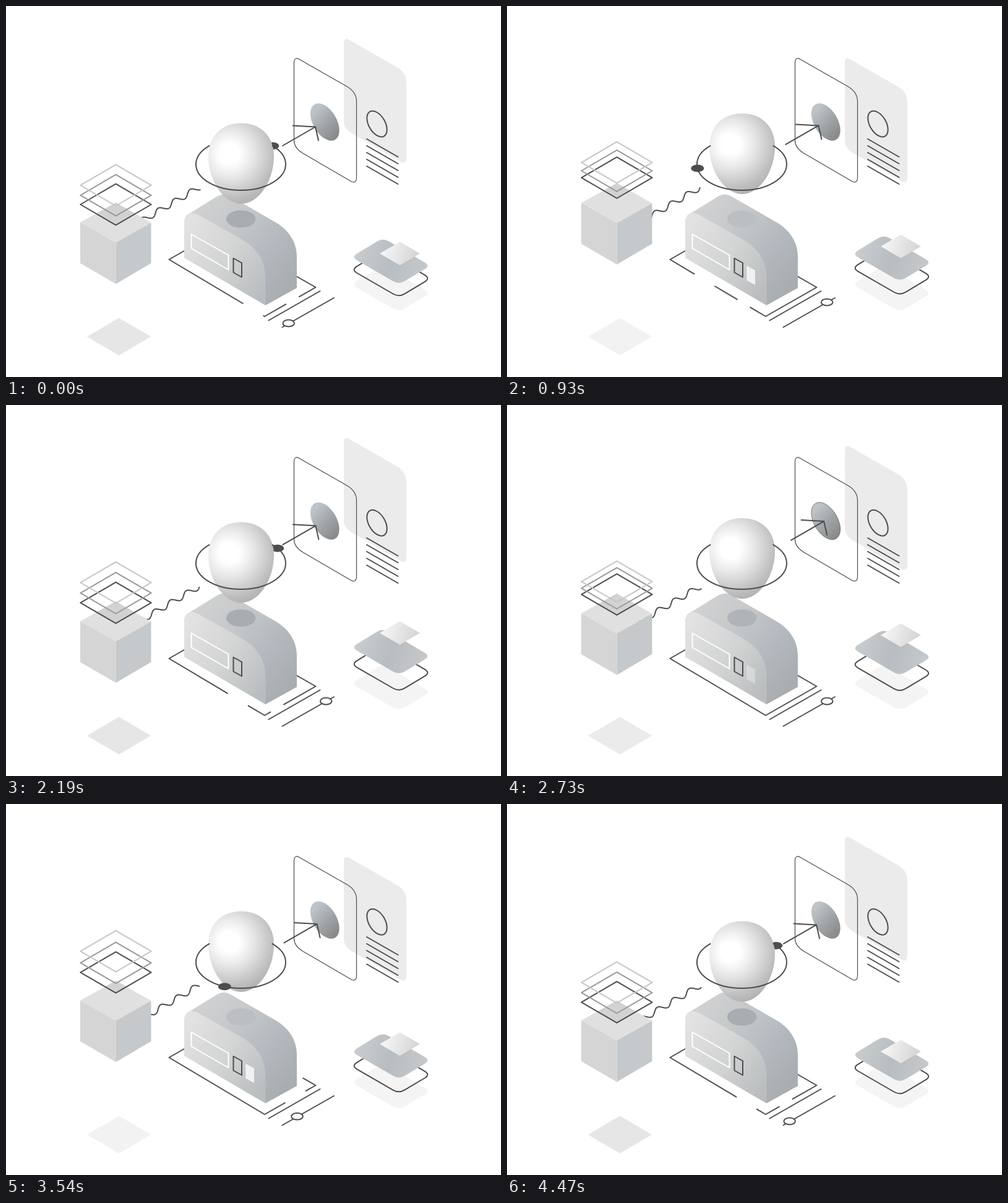
An HTML page with a canvas for the animation above (4500 ms loop, 800 px wide and 600 px high).

```html
<!DOCTYPE html>
<html lang="en">
<head>
<meta charset="utf-8">
<title>Isometric machine</title>
<style>
html, body { margin: 0; width: 100%; height: 100%; overflow: hidden; background: #fff; }
canvas { display: block; }
</style>
</head>
<body>
<canvas id="stage" width="800" height="600"></canvas>
<script>
const ctx = document.getElementById('stage').getContext('2d');
const LOOP = 4500, HALF = LOOP / 2, QUARTER = LOOP / 4;
const INK = '#4d4d4d', TAU = Math.PI * 2;

// 0 -> 1 -> 0 over one period
const swing = (t, period, delay = 0) => (1 - Math.cos(TAU * (t - delay) / period)) / 2;
const ease = x => (1 - Math.cos(Math.PI * Math.min(1, Math.max(0, x)))) / 2;
const mix = (a, b, k) => a + (b - a) * k;
const grey = v => `rgb(${v},${v},${v})`;

function linear(x0, y0, x1, y1, ...colors) {
  const g = ctx.createLinearGradient(x0, y0, x1, y1);
  colors.forEach((c, i) => g.addColorStop(i / (colors.length - 1), c));
  return g;
}

function poly(points, closed = true) {
  const p = new Path2D();
  points.forEach(([x, y], i) => i ? p.lineTo(x, y) : p.moveTo(x, y));
  if (closed) p.closePath();
  return p;
}

const rhombus = (cx, cy, w, h) => poly([[cx - w, cy], [cx, cy - h], [cx + w, cy], [cx, cy + h]]);

function fill(path, style) {
  ctx.fillStyle = style;
  ctx.fill(path);
}

function stroke(path, style = INK, width = 2) {
  ctx.strokeStyle = style;
  ctx.lineWidth = width;
  ctx.stroke(path);
}

function ellipse(x, y, rx, ry, from = 0, to = TAU) {
  const p = new Path2D();
  p.ellipse(x, y, rx, ry, 0, from, to);
  return p;
}

function isoCircle(x, y, r) {
  const p = new Path2D(), c = new Path2D();
  c.arc(0, 0, r, 0, TAU);
  p.addPath(c, new DOMMatrix([0.866, 0.5, 0, 1, x, y]));
  return p;
}

function at(x, y, draw) {
  ctx.save();
  ctx.translate(x, y);
  draw();
  ctx.restore();
}

const sheet = new Path2D('M0 8C0 1 3-2 9 2L86 46C96 52 101 60 101 70V193C101 200 97 202 92 199L14 153.500C5 148 0 142 0 133Z');
const egg = new Path2D('M380 189.500C412 189.500 433 211 433 243C433 283 408 320 380 320C352 320 327 283 327 243C327 211 348 189.500 380 189.500Z');
const body = new Path2D('M288 407V350Q288 341 295 336.500L341 308Q352 301.500 363 308L436 350C458 363 470 383 470 405V456L419.500 484Z');
const front = new Path2D('M288 407V351C288 336 297 331 311 338L382 378C406 392 419.500 412 419.500 440V484Z');
const floorLine = poly([[288, 396], [263.5, 410], [418, 502], [500.5, 455], [470, 437.5]], false);

function makePlate() {
  const corners = [[-64, -7], [-13, -38], [64, 7], [13, 37.5]];
  const p = new Path2D(), cut = 11;
  const toward = (a, b) => {
    const k = cut / Math.hypot(b[0] - a[0], b[1] - a[1]);
    return [mix(a[0], b[0], k), mix(a[1], b[1], k)];
  };
  corners.forEach((c, i) => {
    const start = toward(c, corners[(i + 3) % 4]), end = toward(c, corners[(i + 1) % 4]);
    i ? p.lineTo(...start) : p.moveTo(...start);
    p.quadraticCurveTo(...c, ...end);
  });
  p.closePath();
  return p;
}
const plate = makePlate();

// The moon runs at constant speed along its elliptical orbit.
const ORBIT = { x: 379.5, y: 256, rx: 72.5, ry: 42 };
const orbitLength = [0], ORBIT_STEPS = 720;
const orbitAngle = i => -Math.PI / 4 - TAU * i / ORBIT_STEPS;
for (let i = 0; i < ORBIT_STEPS; i++) {
  const a = orbitAngle(i + 0.5);
  orbitLength.push(orbitLength[i] + Math.hypot(ORBIT.rx * Math.sin(a), ORBIT.ry * Math.cos(a)));
}

function moonAngle(t) {
  const goal = (t % HALF) / HALF * orbitLength[ORBIT_STEPS];
  const i = Math.max(1, orbitLength.findIndex(l => l >= goal));
  const k = (goal - orbitLength[i - 1]) / (orbitLength[i] - orbitLength[i - 1]);
  return orbitAngle(i - 1 + k);
}

function drawCards(t) {
  at(546, 53 + 34 * swing(t, HALF), () => fill(sheet, '#ebebeb'));
  stroke(isoCircle(599.5, 190.7, 18.7));
  for (let i = 0; i < 5; i++) {
    const y = 215 + i * 11;
    stroke(poly([[583, y], [633.5, y + 29]], false));
  }
  const push = swing(t, QUARTER);
  const disc = isoCircle(515.3, 187.6, 27);
  fill(disc, linear(496, 172, 535, 208, '#bdc3c7', '#a2a6a9', '#8a8a8a'));
  stroke(disc, `rgba(110,110,110,${push * push})`, 1);
  at(465.5, 84.5, () => stroke(sheet, INK, 1.2));
  at(12.8 * push, -7.8 * push, () => {
    stroke(poly([[447, 226], [500, 195.5]], false));
    stroke(poly([[463.5, 193.5], [500, 195.5], [505, 217.5]], false));
  });
}

function drawWave(t) {
  const wavelength = 30, shift = 7.3 + wavelength * (t % 250) / 250;
  const points = [];
  for (let s = -100; s <= 28.5; s += 0.5) {
    const d = 4.5 * Math.sin(TAU * (s - shift) / wavelength);
    points.push([287 + 0.862 * s - 0.507 * d, 308 - 0.507 * s - 0.862 * d]);
  }
  stroke(poly(points, false));
}

function drawCube(t) {
  const lift = swing(t, HALF);
  fill(rhombus(182.5, 534.7, 51.7, 30.2), grey(mix(230, 243, lift)));
  const y = 318 - 34 * lift;
  const top = poly([[177.5, y], [234.5, y + 32.5], [177.5, y + 64.5], [120, y + 32]]);
  fill(top, '#e0e0e0');
  fill(poly([[120, y + 32], [177.5, y + 64.5], [177.5, y + 131.5], [120, y + 98]]), '#d5d5d5');
  fill(poly([[177.5, y + 64.5], [234.5, y + 32.5], [234.5, y + 98], [177.5, y + 131.5]]), '#c5c9cc');

  const layers = [
    [321.4, 50, 65, INK],
    [307.7, 51, 130, '#999'],
    [294, 56, 195, '#c6c6c6']
  ].map(([base, rise, delay, color]) =>
    [rhombus(177.5, base - rise * swing(t, HALF, delay), 57.2, 33.3), color]);
  ctx.save();
  ctx.clip(top);
  fill(layers[0][0], '#d2d2d2');
  ctx.restore();
  layers.forEach(([path, color]) => stroke(path, color));
}

function drawFloor(t) {
  const tail = 167 + 538 * (t % QUARTER) / QUARTER;
  ctx.save();
  ctx.setLineDash([41.5, 25, 432.5, 39]);
  ctx.lineDashOffset = -(tail + 39);
  stroke(floorLine);
  ctx.restore();
  stroke(poly([[424.5, 508.5], [507.5, 461]], false));
  stroke(poly([[446.5, 519.5], [530, 472]], false));
  const k = ease(t / 950) - ease((t - 2875) / 975);
  const knob = ellipse(mix(456.7, 517.2, k), mix(513, 479, k), 9.3, 5.4);
  fill(knob, '#fff');
  stroke(knob);
}

function drawMachine(t) {
  const lift = swing(t, HALF);
  fill(body, linear(320, 315, 470, 440, '#d0d1d2', '#c5c8ca', '#b3b9be', '#a9adb0'));
  fill(front, linear(288, 360, 425, 450, '#e2e2e2', '#d3d4d4', '#b9bdbf'));
  fill(ellipse(379.7, 344.5, 23.8, 14), `rgb(${mix(168, 188, lift)},${mix(173, 192, lift)},${mix(177, 196, lift)})`);
  stroke(poly([[299.5, 369], [359.5, 403], [359.5, 426.5], [299.5, 392]]), '#fff');
  stroke(poly([[367.5, 408], [381, 415.5], [381, 438.5], [367.5, 431]]));
  fill(poly([[387.3, 420], [401, 427.5], [401, 451], [387.3, 443.5]]), `rgba(244,244,244,${lift})`);
}

function drawPlanet(t) {
  const a = moonAngle(t);
  const moon = ellipse(ORBIT.x + ORBIT.rx * Math.cos(a), ORBIT.y + ORBIT.ry * Math.sin(a), 10.5, 6);
  const inFront = Math.sin(a) > 0;
  if (!inFront) fill(moon, INK);
  at(0, -17 * swing(t, HALF), () => {
    const g = ctx.createRadialGradient(361, 239, 0, 361, 239, 95);
    g.addColorStop(0, '#fff');
    g.addColorStop(0.17, '#fff');
    g.addColorStop(0.4, '#e8e8e8');
    g.addColorStop(0.75, '#bebebe');
    g.addColorStop(1, '#a8a8a8');
    fill(egg, g);
  });
  stroke(ellipse(ORBIT.x, ORBIT.y, ORBIT.rx, ORBIT.ry, -0.79, Math.PI + 0.79));
  if (inFront) fill(moon, INK);
}

function drawStack(t) {
  const lift = swing(t, LOOP);
  at(622, 457.2, () => fill(plate, '#f4f4f4'));
  at(622, 433.5 - 7.5 * lift, () => stroke(plate));
  at(622, 413 - 14 * lift, () =>
    fill(plate, linear(-55, -15, 55, 20, '#c8cccf', '#b8bdc1', '#c6c9cb')));
  at(636.5, 400.3 - 31.5 * lift, () =>
    fill(rhombus(0, 0, 32.5, 19), linear(-25, -6, 25, 8, '#f4f4f4', '#d6d6d6')));
}

function draw(now) {
  const t = now % LOOP;
  ctx.fillStyle = '#fff';
  ctx.fillRect(0, 0, 800, 600);
  drawCards(t);
  drawWave(t);
  drawCube(t);
  drawFloor(t);
  drawMachine(t);
  drawPlanet(t);
  drawStack(t);
}

ctx.lineCap = 'round';
ctx.lineJoin = 'round';
let begin;
function tick(now) {
  begin ??= now;
  draw(Math.max(0, now - begin));
  requestAnimationFrame(tick);
}
draw(0);
requestAnimationFrame(tick);
</script>
</body>
</html>
```
